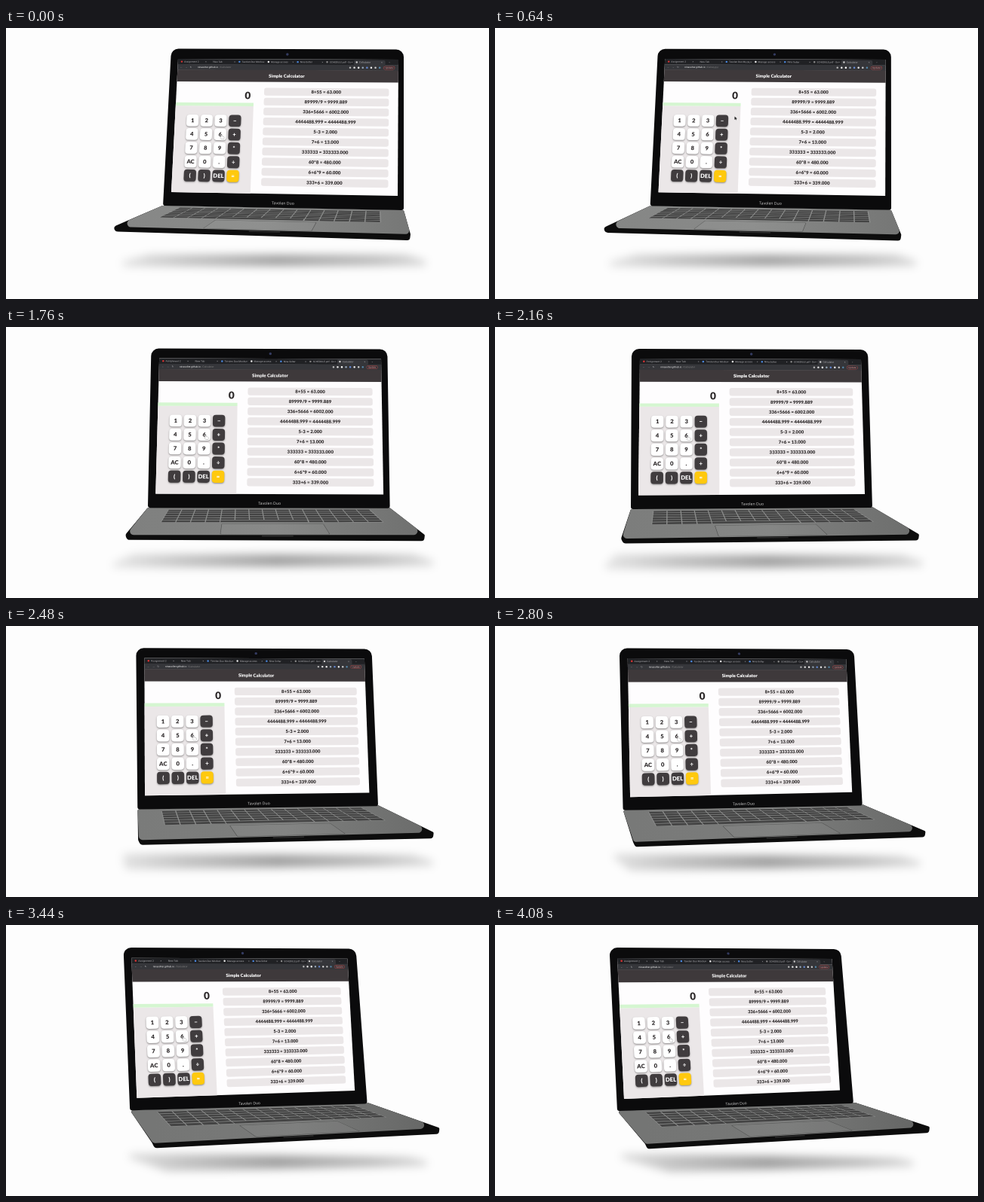
An HTML page with a canvas for the animation above (4160 ms loop, 640x360 px).

```html
<!DOCTYPE html>
<html lang="en">
<head>
<meta charset="utf-8">
<style>
html, body { margin: 0; width: 100%; height: 100%; overflow: hidden; background: #fdfdfd; }
canvas { display: block; width: 640px; height: 360px; }
</style>
</head>
<body>
<canvas id="stage" width="640" height="360"></canvas>
<script>
const ctx = document.getElementById('stage').getContext('2d');
const LOOP = 4160, STEP = 80, MID = .533;
const SANS = 'Roboto, sans-serif';

// Turn progress over time
const times = [0, 640, 1280, 2160, 2800, 3440, 4080];
const turns = [0, .04, .18, MID, .783, .933, 1];
const slope = i => i && i < 6 ? (turns[i + 1] - turns[i - 1]) / (times[i + 1] - times[i - 1]) : 0;
function progress(t) {
  let i = 0;
  while (i < 5 && t > times[i + 1]) i++;
  const d = times[i + 1] - times[i], u = (t - times[i]) / d, v = 1 - u;
  return turns[i] * v * v * (1 + 2 * u) + turns[i + 1] * u * u * (1 + 2 * v)
    + d * u * v * (slope(i) * v - slope(i + 1) * u);
}

// Corners at the start, middle and end of the turn: TL, TR, BR, BL
const poses = {
  screen: [
    [228, 41, 520, 42, 519, 223, 219, 218],
    [192, 42, 485, 43, 490, 222, 190, 223.5],
    [162, 44, 446.5, 45, 457, 219.5, 171, 231]],
  lid: [
    [219, 27.5, 527, 28.5, 527, 242, 208, 236],
    [181, 29, 494, 30, 500, 240, 180, 242],
    [151.5, 30, 458, 32, 475, 237, 162, 247]],
  deck: [
    [207, 236, 527, 242, 536, 274, 143, 264],
    [180, 242, 500, 239, 562, 275.5, 168, 281],
    [162, 247, 477, 236, 576, 268, 200, 291]],
  shadow: [
    [190, 301, 530, 301, 580, 316, 125, 317],
    [160, 302, 540, 303, 590, 318, 140, 322],
    [140, 303, 530, 309, 590, 320, 230, 328]]
};
function pose(name, p) {
  const [a, b, c] = poses[name];
  return a.map((start, i) => {
    const s = (b[i] - start) / MID, bend = (c[i] - b[i]) / (1 - MID) - s;
    return start + s * p + bend * p * (p - MID);
  });
}

// Maps a w by h plane onto a quadrilateral
function plane(w, h, [x0, y0, x1, y1, x2, y2, x3, y3]) {
  const ax = x1 - x2, ay = y1 - y2, bx = x3 - x2, by = y3 - y2;
  const sx = x0 - x1 + x2 - x3, sy = y0 - y1 + y2 - y3, den = ax * by - bx * ay;
  const g = (sx * by - bx * sy) / den, k = (ax * sy - sx * ay) / den;
  return (x, y) => {
    const u = x / w, v = y / h, q = g * u + k * v + 1;
    return [(x0 + (x1 - x0 + g * x1) * u + (x3 - x0 + k * x3) * v) / q,
      (y0 + (y1 - y0 + g * y1) * u + (y3 - y0 + k * y3) * v) / q];
  };
}

// Straight polygon in stage pixels with rounded corners
function poly(points, radii, fill) {
  const n = points.length / 2, at = i => [points[i % n * 2], points[i % n * 2 + 1]];
  const [ax, ay] = at(n - 1), [bx, by] = at(0);
  ctx.beginPath();
  ctx.moveTo((ax + bx) / 2, (ay + by) / 2);
  for (let i = 0; i < n; i++) ctx.arcTo(...at(i), ...at(i + 1), radii[i]);
  ctx.closePath();
  ctx.fillStyle = fill;
  ctx.fill();
}

// Rounded box lying on a plane
function box(map, x, y, w, h, fill, r = 0) {
  const X = x + w, Y = y + h;
  const go = (a, b) => ctx.lineTo(...map(a, b));
  const turn = (a, b, c, d) => ctx.quadraticCurveTo(...map(a, b), ...map(c, d));
  ctx.beginPath();
  go(x + r, y); go(X - r, y); turn(X, y, X, y + r);
  go(X, Y - r); turn(X, Y, X - r, Y);
  go(x + r, Y); turn(x, Y, x, Y - r);
  go(x, y + r); turn(x, y, x + r, y);
  ctx.closePath();
  ctx.fillStyle = fill;
  ctx.fill();
}

// Runs paint with the origin at a point of the plane and its local slant
function onPlane(map, x, y, paint) {
  const [ax, ay] = map(x - 1, y), [bx, by] = map(x + 1, y);
  const [cx, cy] = map(x, y - 1), [dx, dy] = map(x, y + 1);
  ctx.save();
  ctx.transform((bx - ax) / 2, (by - ay) / 2, (dx - cx) / 2, (dy - cy) / 2, ...map(x, y));
  paint();
  ctx.restore();
}
function text(map, str, x, y, font, fill, align = 'center') {
  onPlane(map, x, y, () => {
    ctx.font = font;
    ctx.fillStyle = fill;
    ctx.textAlign = align;
    ctx.textBaseline = 'middle';
    ctx.fillText(str, 0, 0);
  });
}

const bold = size => `900 ${size}px Lato, sans-serif`;
const tabs = ['Assignment 2', 'New Tab', 'Tavolen Duo Mocku', 'Manage access', 'Nina Solter', 'SCHEDULE.pdf - Go', 'Calculator'];
const tabColors = ['#d33', '#202124', '#4a88e0', '#eee', '#4a88e0', '#888', '#ccc'];
const toolColors = ['#bbb', '#eee', '#fff', '#9ab', '#668bd8', '#eee', '#ccc', '#58a'];
const keys = ['1', '2', '3', '−', '4', '5', '6', '+', '7', '8', '9', '*', 'AC', '0', '.', '÷', '(', ')', 'DEL', '='];
const sums = ['8+55 = 63.000', '89999/9 = 9999.889', '336+5666 = 6002.000', '4444488.999 = 4444488.999', '5-3 = 2.000',
  '7+6 = 13.000', '333333 = 333333.000', '60*8 = 480.000', '6+6*9 = 60.000', '333+6 = 339.000'];

function drawBrowser(map) {
  const small = (s, x, y, fill = '#b4b4b8', align = 'left') => text(map, s, x, y, '6.5px ' + SANS, fill, align);
  box(map, 0, 0, 584, 16, '#202124');
  box(map, 0, 15, 584, 16, '#35363a');
  box(map, 468, 2, 82, 15, '#35363a', 4);
  tabs.forEach((name, i) => {
    const x = 8 + i * 77.5;
    box(map, x, 5, 5, 5, tabColors[i], 2.5);
    small(name, x + 9, 8);
    small('×', x + 66, 8);
  });
  small('⌄', 558, 7);
  ['←', '→', '↻'].forEach((c, i) => small(c, 7 + i * 13, 23));
  small('ninasolter.github.io', 54, 23, '#fff');
  small('/Calculator', 112, 23, '#888');
  toolColors.forEach((c, i) => box(map, 456 + i * 11, 20, 5, 5, c, 2.5));
  box(map, 545, 18, 30, 10, '#a44', 5);
  box(map, 546, 19, 28, 8, '#35363a', 4);
  small('Update', 560, 23, '#e88', 'center');
}

function drawCalculator(map) {
  box(map, 0, 30, 584, 33, '#3e393b');
  text(map, 'Simple Calculator', 292, 47, bold(12), '#fff');
  text(map, '0', 207 - 8, 102, bold(27), '#2d292a', 'right');
  box(map, 0, 130, 207, 234, '#ebe7e8');
  box(map, 0, 121, 207, 9, '#d5f6d1');
  keys.forEach((c, i) => {
    const col = i % 4, row = i >> 2, x = 31 + col * 37.5, y = 154 + row * 37.2;
    const dark = col === 3 || row === 4;
    ctx.shadowColor = '#0006';
    ctx.shadowBlur = 2;
    ctx.shadowOffsetY = 1;
    box(map, x, y, 32, 32, c === '=' ? '#ffc90e' : dark ? '#403c3e' : '#fff', 8);
    ctx.shadowColor = '#0000';
    text(map, c, x + 16, y + 16.5, bold(15), dark ? '#fff' : '#2d292a');
  });
  sums.forEach((s, i) => {
    box(map, 234, 79.5 + i * 27, 326, 21, '#ebe7e8', 6);
    text(map, s, 397, 90.5 + i * 27, bold(12), '#2d292a');
  });
}

const arrow = new Path2D('M0 0v9l2-2 2 3 1-1-1-3h3z');
const hand = new Path2D('M0 0q2-1 2 1v4l5 1q1 1 0 6h-6l-3-5q1-1 2 0z');
function drawCursor(map, t) {
  const away = t < 1280 ? Math.sin(Math.PI * t / 1280) ** 2 : 0;
  const pointing = away < .3;
  onPlane(map, 125 + 67 * away, 208 - 50 * away, () => {
    ctx.fillStyle = pointing ? '#fff' : '#222';
    ctx.strokeStyle = pointing ? '#333' : '#fff';
    ctx.lineWidth = .8;
    ctx.stroke(pointing ? hand : arrow);
    ctx.fill(pointing ? hand : arrow);
  });
}

function drawShadow(p) {
  const fade = ctx.createLinearGradient(110, 0, 610, 0);
  [.04, .22, .36, .25, .05].forEach((a, i) => fade.addColorStop(i / 4, `rgba(0,0,0,${a})`));
  ctx.filter = 'blur(6px)';
  poly(pose('shadow', p), [4, 4, 4, 4], fade);
  ctx.filter = 'none';
}

function drawDeck(p) {
  const quad = pose('deck', p), map = plane(400, 200, quad);
  const [lx, ly, rx, ry, fx, fy, gx, gy] = quad;
  poly([lx, ly, rx, ry, fx, fy, fx - 1, fy + 8, gx + 2, gy + 6.5, gx - 1, gy], [2, 2, 2, 4, 5, 4], '#0d0d0d');
  const metal = ctx.createLinearGradient(gx, 0, fx, 0), shade = 134 - 18 * p;
  [0, 4, -16].forEach((d, i) => metal.addColorStop(i / 2, `rgb(${shade + d},${shade + d + 1},${shade + d})`));
  poly(quad, [2, 2, 5, 5], metal);

  box(map, 36, 16, 328, 102, '#8f908f', 3);
  for (let row = 0; row < 6; row++)
    for (let col = 0; col < 15; col++)
      if (row < 5 || col < 4 || col > 9) box(map, 37 + col * 21.8, 17 + row * 17, 20.3, 14, '#444');
  box(map, 124, 102, 129, 14, '#444');

  const lighter = `rgba(255,255,255,.04)`;
  box(map, 126, 128, 148, 68, '#0005', 2);
  box(map, 126.8, 129.5, 146.4, 65, metal, 2);
  box(map, 126.8, 129.5, 146.4, 65, lighter, 2);
  const front = s => [gx + (fx - gx) * s, gy + (fy - gy) * s + 1.5];
  ctx.beginPath();
  ctx.moveTo(...front(.455));
  ctx.lineTo(...front(.56));
  ctx.lineWidth = 1.5;
  ctx.strokeStyle = '#2c2c2c';
  ctx.stroke();
}

function drawLid(p, t) {
  const map = plane(584, 364, pose('screen', p));
  poly(pose('lid', p), [10, 10, 3, 3], '#0b0b0c');
  box(map, 289, -17, 7, 7, '#343b60', 3.5);
  text(map, 'Tavolen Duo', 292, 389, '10px "Open Sans", sans-serif', '#d0d0d0');
  box(map, 0, 0, 584, 364, '#fefdfe');
  drawBrowser(map);
  drawCalculator(map);
  drawCursor(map, t);
}

function draw(now) {
  const t = Math.floor(now % LOOP / STEP) * STEP, p = progress(t);
  ctx.fillStyle = '#fdfdfd';
  ctx.fillRect(0, 0, 640, 360);
  drawShadow(p);
  drawDeck(p);
  drawLid(p, t);
}

const start = performance.now();
function tick() {
  draw(performance.now() - start);
  requestAnimationFrame(tick);
}
tick();
</script>
</body>
</html>
```
